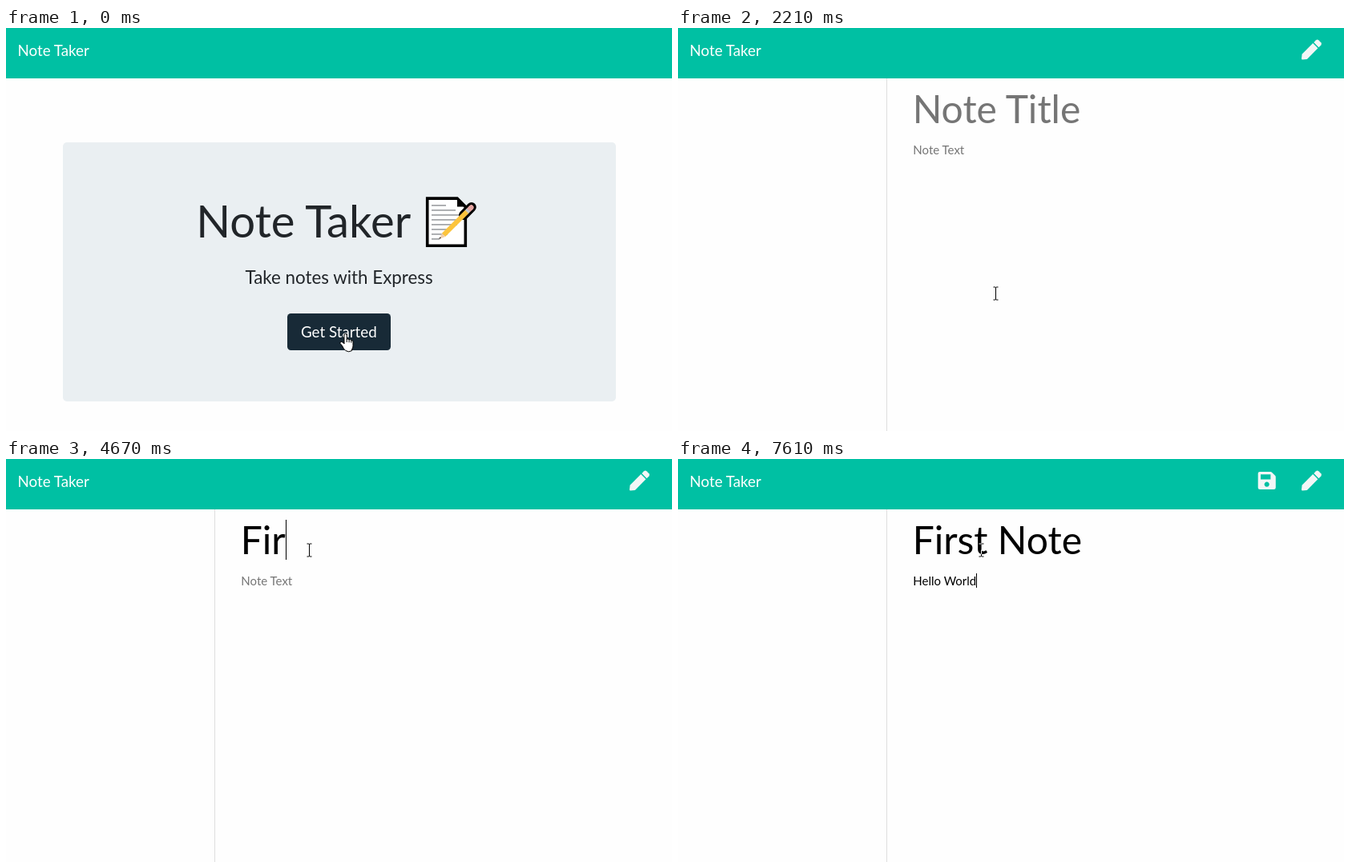
Recreate the animation shown at these times as an HTML page. Size 831x504 px, loop 7990 ms.

```html
<!DOCTYPE html>
<html lang="en">
<head>
<meta charset="utf-8">
<title>Note Taker</title>
<style>
  html, body { margin: 0; width: 100%; height: 100%; overflow: hidden; background: #fefefe; }
  svg { display: block; width: 831px; height: 504px; font-family: Lato, sans-serif; }
  text { white-space: pre; }
  .icon { fill: #f3f6f6; }
  .cursor { fill: #fff; stroke: #000; stroke-width: 1; stroke-linejoin: round; }
  #beam { fill: none; stroke: #fff; mix-blend-mode: difference; }
</style>
</head>
<body>
<svg viewBox="0 0 831 504">
  <rect width="831" height="504" fill="#fefefe"/>
  <rect width="831" height="63" fill="#00c0a3"/>
  <text x="14.5" y="34.5" font-size="18.75" fill="#fff">Note Taker</text>

  <g id="home">
    <rect x="71" y="143" width="690" height="324" rx="5" fill="#eaeff2"/>
    <text x="237.3" y="262" font-size="56.25" fill="#212529">Note Taker</text>
    <g id="memo" transform="translate(0 .4)">
      <path d="M525.7 212.7H563L573.3 223V271.8H525.7Z" fill="#fff" stroke="#000" stroke-width="3.6"/>
      <path d="M563 212v11h11z"/>
      <path d="M531 221.5h18M531 227.5h30M531 233.5h35M531 239.5h35M531 245.5h32M531 251.5h25M531 257.5h20M531 263.5h10" stroke="#a3a5a8" stroke-width="1.6"/>
      <path d="M571 233.5L580.8 223.7" stroke="#000" stroke-width="12" stroke-linecap="round"/>
      <path d="M580 224.5L580.6 223.9" stroke="#e5a5a2" stroke-width="6" stroke-linecap="round"/>
      <path d="M577 227.5L580.6 223.9" stroke="#e5a5a2" stroke-width="6"/>
      <path d="M574.5 230L577.2 227.3" stroke="#c9c9c9" stroke-width="6"/>
      <path d="M546 258.5L575 229.5" stroke="#fcc43c" stroke-width="6"/>
      <path d="M543.9 256.4l4.2 4.2-7.6 2.9z" fill="#f1cfab"/>
      <path d="M541.6 261.2l1.2 1.2-2.6 1z"/>
    </g>
    <text x="298.6" y="320" font-size="22.35" fill="#212529">Take notes with Express</text>
    <rect id="ring" x="348" y="354" width="135" height="52" rx="7" fill="#8799a1"/>
    <rect x="351" y="357" width="129" height="46" rx="4.5" fill="#182a37"/>
    <text x="368" y="386.5" font-size="18.75" fill="#fff">Get Started</text>
  </g>

  <g id="notes">
    <path d="M260.5 63V504" stroke="#dedede"/>
    <text id="title" x="292.7" y="119" font-size="48"></text>
    <text id="body" x="293.3" y="158" font-size="15"></text>
    <rect id="caret" width="1"/>
    <g id="pen" class="icon">
      <path d="M792.2 19.1l6.2 6.2-13.5 13.6-5.6.6q-1.4.1-1.3-1.3l.6-5.5z"/>
      <path d="M793.3 18l2.8-2.8q1.6-1.3 3.2 0l3 3q1.3 1.6 0 3.2l-2.8 2.8z"/>
    </g>
    <path id="save" class="icon" fill-rule="evenodd" d="M726 16H739.3q1 0 1.7.7l4.1 4.1q.7.7.7 1.7V35.7q0 2.3-2.3 2.3H726q-2.3 0-2.3-2.3V18.3q0-2.3 2.3-2.3zM727 19.2v6.2h12.4v-6.2zM734.7 28.6a3.1 3.1 0 1 0 .01 0z"/>
  </g>

  <path id="bar" d="M-1 497.5H271.5q3 0 3 3V506H-1z" fill="#fefefe" stroke="#d9dbdc"/>

  <g id="hand" class="cursor">
    <path d="M5.5 13.5V2.6q0-1.8 1.6-1.8t1.6 1.8V7.8q1.8-1.2 2.9.6 1.7-1 2.7.7 2.2-.6 2.2 1.9v5q0 2.6-1.5 4.5v1.6q-3.8 2.4-7.6 0Q4.6 20 3.3 16.5 1.8 14.2.5 13q-.6-2 1.3-2.1 2 .2 3.7 2.6z"/>
    <path d="M8.7 7.5v4M11.6 8.4v3.4M14.3 9.1v3" fill="none"/>
  </g>
  <path id="arrow" class="cursor" d="M0 0V15.5l3.5-3.3 2.7 6.2 2.7-1.2-2.7-6H11z"/>
  <path id="beam" d="M-3 -8H-1Q0 -8 0 -7Q0 -8 1 -8H3M0 -7V7M-3 8H-1Q0 8 0 7Q0 8 1 8H3"/>
</svg>
<script>
const LOOP = 7990;
const $ = id => document.getElementById(id);

// Each track is a list of [start ms, value], held until the next step.
const tracks = {
  page: [[0, 'home'], [1570, 'notes']],
  bar: [[0, 0], [130, .5], [250, 1], [2090, .5], [2210, 0]],
  ring: [[0, 0], [910, .5], [1040, 1]],
  pen: [[0, 0], [1710, 1]],
  save: [[0, 0], [6340, 1]],
  cursor: [
    [0, ['hand', 416.5, 381.5]], [250, ['hand', 415, 380]], [770, ['arrow', 421, 380.5]],
    [1570, ['hand', 415, 380]], [2090, ['beam', 423.5, 390]], [2210, ['beam', 396.5, 332]],
    [2330, ['beam', 365.5, 234]], [2470, ['beam', 354.5, 188]], [2600, ['beam', 362.5, 146]],
    [2720, ['beam', 378.5, 114]]
  ],
  caret: [[0, ''], [2850, 'title'], [3350, ''], [3890, 'title'], [5700, 'body']],
  title: [[0, ''], ...typing('First Note', [[4410, 1], [4530, 2], [4670, 3], [4800, 5], [4920, 6], [5190, 7], [5310, 9], [5440, 10]])],
  body: [[0, ''], ...typing('Hello World', [[6220, 1], [6340, 2], [6460, 3], [6580, 4], [6860, 6], [7110, 7], [7235, 8], [7360, 9], [7485, 10], [7610, 11]])]
};

// Caret boxes: x while empty, x where typed text begins.
const fields = {
  title: { hint: 'Note Title', x: 291, left: 293.3, top: 76, height: 50 },
  body: { hint: 'Note Text', x: 293, left: 293, top: 143, height: 18 }
};

function typing(text, steps) {
  return steps.map(([t, n]) => [t, text.slice(0, n)]);
}

function at(name, t) {
  let value;
  for (const [start, v] of tracks[name]) if (start <= t) value = v;
  return value;
}

function show(id, on) {
  $(id).style.display = on ? '' : 'none';
}

function draw(t) {
  const page = at('page', t);
  for (const id of ['home', 'notes']) show(id, id === page);
  for (const id of ['bar', 'ring', 'pen', 'save']) $(id).style.opacity = at(id, t);

  for (const id in fields) {
    const text = at(id, t);
    $(id).textContent = text || fields[id].hint;
    $(id).setAttribute('fill', text ? '#000' : '#757575');
  }

  const focus = at('caret', t);
  show('caret', focus);
  if (focus) {
    const { x, left, top, height } = fields[focus];
    const end = at(focus, t) ? left + $(focus).getComputedTextLength() : x;
    $('caret').setAttribute('x', Math.round(end));
    $('caret').setAttribute('y', top);
    $('caret').setAttribute('height', height);
  }

  const [shape, x, y] = at('cursor', t);
  for (const id of ['hand', 'arrow', 'beam']) show(id, id === shape);
  $(shape).setAttribute('transform', `translate(${x} ${y})`);
}

const begin = performance.now();
function tick(now) {
  draw(Math.max(0, now - begin) % LOOP);
  requestAnimationFrame(tick);
}
draw(0);
requestAnimationFrame(tick);
</script>
</body>
</html>
```
